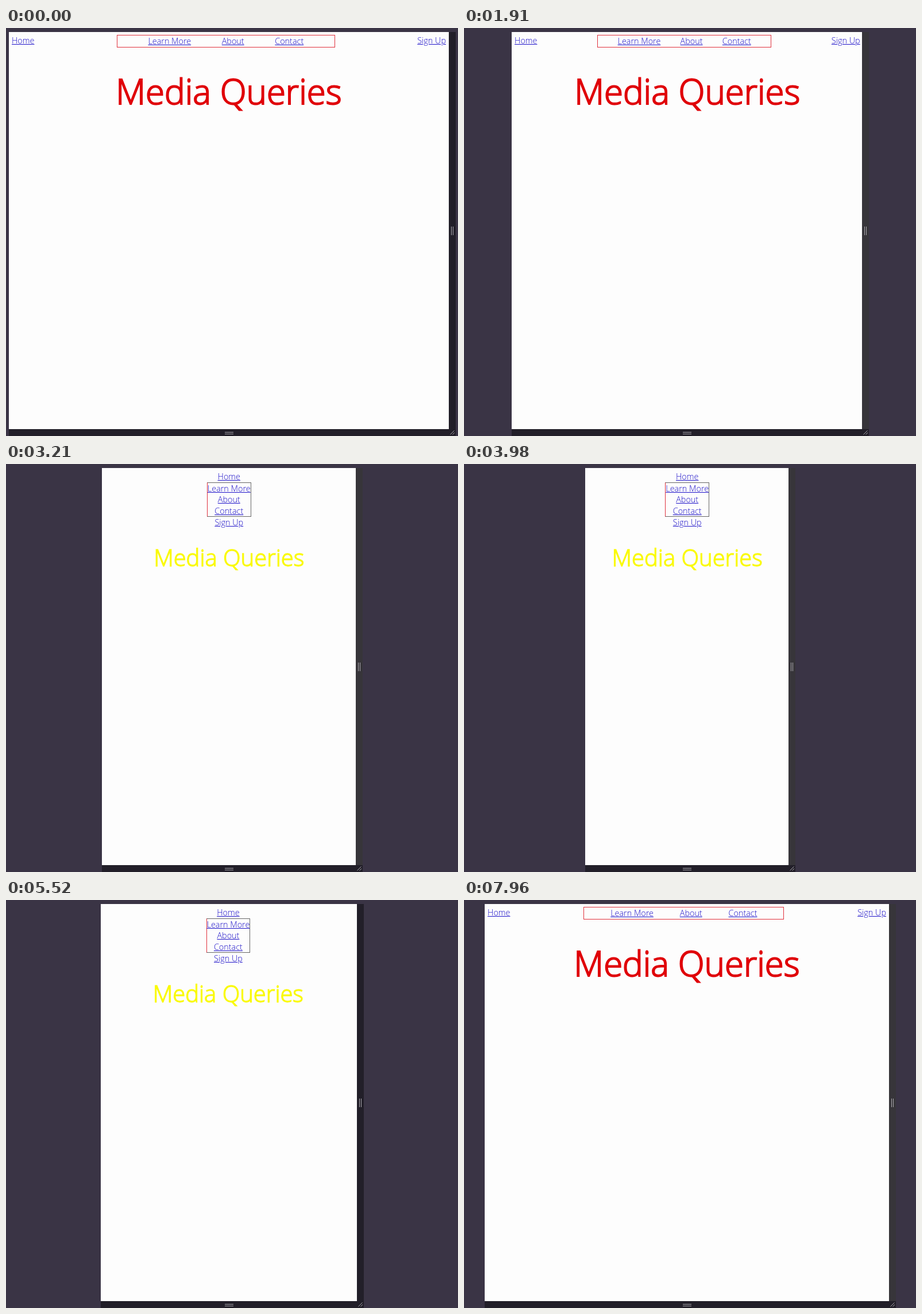
An HTML page for the animation above (7990 ms loop, 787 px wide and 711 px high).

```html
<!DOCTYPE html>
<html lang="en">
<head>
<meta charset="utf-8">
<title>Media Queries</title>
<style>
  * { box-sizing: border-box; }
  html, body { margin: 0; width: 100%; height: 100%; overflow: hidden; background: #3a3445; }
  body { position: relative; font: 300 14.4px/19.5px "Open Sans", sans-serif; }
  #frame { position: absolute; top: 7px; height: 704px; }
  #page { position: absolute; inset: 0 0 12px; background: #fdfdfd; overflow: hidden; }
  #site { position: absolute; inset: 0 auto 0 0; padding: 5px; text-align: center; }
  nav { display: flex; justify-content: space-between; }
  nav div { display: flex; justify-content: space-evenly; box-sizing: content-box; width: 50%; border: 1px solid #e0303c; }
  a { color: #1c10c8; text-decoration: underline; white-space: nowrap; }
  h1 { position: absolute; left: 0; right: 0; top: 72.5px; margin: 0; font: 300 60px/1 "Open Sans", sans-serif;
       color: #e00008; -webkit-text-stroke: 2px; white-space: nowrap; }
  .narrow nav, .narrow nav div { flex-direction: column; align-items: center; }
  .narrow nav div { width: auto; border-color: #666 #666 #666 #e0303c; }
  .narrow h1 { top: 135.5px; font-size: 40px; color: #fafa08; -webkit-text-stroke-width: 1.3px; }
  #side { position: absolute; left: 100%; top: 0; width: 12px; height: 692px; }
  #base { position: absolute; left: 0; right: -12px; bottom: 0; height: 12px; background: #221f29; }
  .grip { position: absolute; border: 0 solid #aaa8ae; }
  #side .grip { left: 4px; top: 339px; width: 4px; height: 15px; border-width: 0 1px; }
  #base .grip { left: calc(50% - 13px); top: 5px; width: 15px; height: 4px; border-width: 1px 0; }
  svg { position: absolute; right: 0; top: 0; fill: none; stroke: #aaa8ae; }
</style>
</head>
<body>
<div id="frame">
  <div id="page">
    <div id="site">
      <nav>
        <a>Home</a>
        <div><a>Learn More</a><a>About</a><a>Contact</a></div>
        <a>Sign Up</a>
      </nav>
      <h1>Media Queries</h1>
    </div>
  </div>
  <div id="side"><div class="grip"></div></div>
  <div id="base"><div class="grip"></div>
    <svg width="12" height="12"><path d="M2.5 9.5l7-7M6.5 9.5l3.5-3.5"/></svg>
  </div>
</div>
<script>
const LOOP = 7990, CENTER = 388, BREAKPOINT = 540, LAYOUT_LAG = 11;

// [time, left edge] of the page while its side is dragged
const drag = [
  [0, 5], [1040, 5], [1910, 83], [2640, 133.5], [3210, 167], [3440, 170.5], [3980, 211],
  [4250, 226], [4420, 230], [4510, 230], [5050, 200], [5520, 165], [5850, 118],
  [6690, 70.5], [7450, 40], [7750, 35], [LOOP, 36.1]
];

const slope = i => drag[i + 1] && drag[i]
  ? (drag[i + 1][1] - drag[i][1]) / (drag[i + 1][0] - drag[i][0]) : 0;

// Harmonic mean keeps the curve monotone between points
function tangent(i) {
  const a = slope(i - 1), b = slope(i);
  return a * b > 0 ? 2 * a * b / (a + b) : 0;
}

function leftAt(t) {
  t = Math.max(0, t);
  const i = drag.findIndex((p, k) => k === drag.length - 2 || t < drag[k + 1][0]);
  const [t0, x0] = drag[i], [t1, x1] = drag[i + 1];
  const d = t1 - t0, u = (t - t0) / d, v = 1 - u;
  return x0 * v * v * (1 + 2 * u) + x1 * u * u * (3 - 2 * u)
    + d * u * v * (v * tangent(i) - u * tangent(i + 1));
}

const widthAt = t => 2 * (CENTER - leftAt(t));
const [frame, site, side] = ["frame", "site", "side"].map(id => document.getElementById(id));

function draw(now) {
  const t = now % LOOP, width = widthAt(t), layout = widthAt(t - LAYOUT_LAG);
  frame.style.left = leftAt(t) + "px";
  frame.style.width = width + "px";
  site.style.width = layout + "px";
  site.className = layout <= BREAKPOINT ? "narrow" : "";
  side.style.background = width < widthAt(t - 30) ? "#37353a" : "#221f29";
  requestAnimationFrame(draw);
}
draw(performance.now());
</script>
</body>
</html>
```
